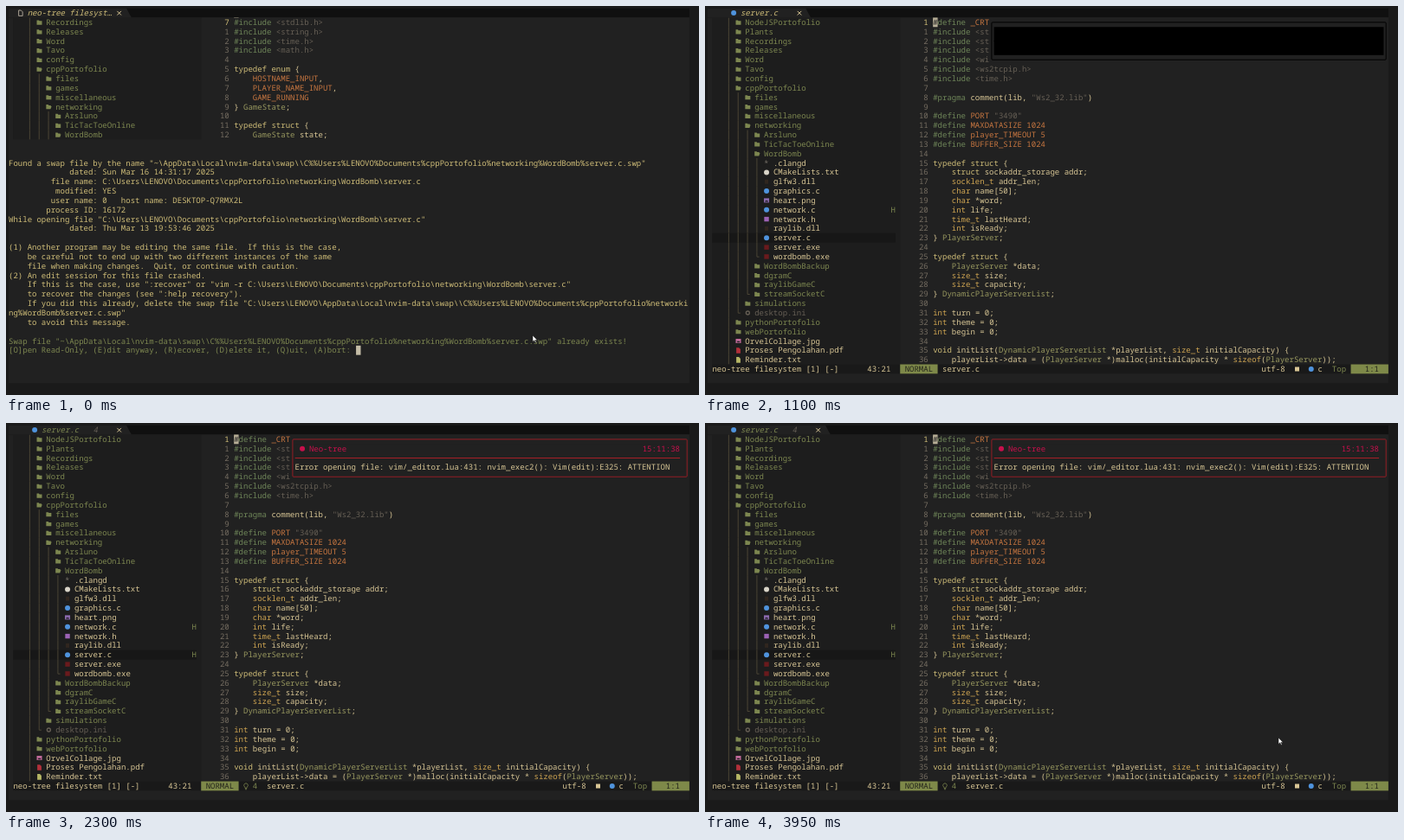
Animation of 800 by 450 pixels, one loop 4000 ms. Source, as an HTML page:

```html
<!DOCTYPE html>
<html lang="en">
<head>
<meta charset="utf-8">
<title>Editor swap file prompt</title>
<style>
html, body { margin: 0; width: 100%; height: 100%; overflow: hidden; background: #1a1a1a; }
svg { display: block; width: 800px; height: 450px; }
text {
  font: 9.033px "Noto Sans Mono", "DejaVu Sans Mono", monospace;
  white-space: pre;
  text-rendering: geometricPrecision;
}
.italic { font-style: italic; }

#prompt, #early, #plain, #hint, #notify { animation: 4s step-end infinite; }
#prompt { animation-name: prompt; }
#early { animation-name: early; }
#plain { animation-name: plain; }
#hint { animation-name: hint; }
#notify { animation-name: notify; }
@keyframes prompt { 0% { visibility: visible } 21.25%, 100% { visibility: hidden } }
@keyframes early { 0% { visibility: visible } 25%, 100% { visibility: hidden } }
@keyframes plain { 0% { visibility: hidden } 21.25% { visibility: visible } 43.75%, 100% { visibility: hidden } }
@keyframes hint { 0% { visibility: hidden } 43.75%, 100% { visibility: visible } }
@keyframes notify { 0% { visibility: hidden } 25%, 100% { visibility: visible } }

.fill { animation: fill 4s linear infinite; }
.frame { fill: none; animation: frame 4s linear infinite; }
.rule { animation: rule 4s linear infinite; }
.msg { animation: msg 4s linear infinite; }
@keyframes fill { 0%, 27.5% { fill: #000 } 37.5%, 100% { fill: #212121 } }
@keyframes frame { 0%, 27.5% { stroke: #000 } 38.75% { stroke: #47171a } 50%, 100% { stroke: #941d25 } }
@keyframes rule { 0%, 27.5% { stroke: #000 } 38.75% { stroke: #7c191f } 50%, 100% { stroke: #a81f28 } }
@keyframes msg { 0%, 27.5% { opacity: 0 } 38.75% { opacity: .9 } 46%, 100% { opacity: 1 } }

#pointer { animation: seen 4s step-end infinite, move 4s ease-in-out infinite; }
@keyframes seen {
  0% { visibility: visible } 21.25% { visibility: hidden } 64%, 100% { visibility: visible }
}
@keyframes move {
  0%, 64% { transform: translate(608px, 381px) }
  72.5%, 89.5% { transform: translate(433px, 315px) }
  98.75%, 100% { transform: translate(662px, 364px) }
}
</style>
</head>
<body>
<svg viewBox="0 0 800 450">
  <clipPath id="below"><rect y="13.4" width="800" height="437"/></clipPath>
  <rect width="800" height="450" fill="#1a1a1a"/>
  <rect x="3" y="2.6" width="785.9" height="433.6" fill="#212121"/>
  <rect x="3" y="2.6" width="785.9" height="10.8" fill="#101010"/>
  <g id="editor"></g>
  <g id="plain"></g>
  <g id="hint"></g>
  <g id="early" clip-path="url(#below)"></g>
  <g id="prompt"></g>
  <g id="notify"></g>
  <path id="pointer" d="M0 0v7.4l1.8-1.6 1.3 2.7 1.1-.5-1.3-2.6h2.4z" fill="#fff" stroke="#111" stroke-width=".5"/>
</svg>
<script>
const CW = 5.42, LH = 10.84, LEFT = 3, TOP = 2.6;
const C = {
  fg: '#d8c695', olive: '#7d8750', green: '#6f8659', khaki: '#cfbd78', yellow: '#cfa552', orange: '#c77640',
  dim: '#665f55', num: '#756d61', line: '#57503b', bg: '#212121', side: '#1d1d1d',
  dark: '#191919', block: '#7e8949', blue: '#4f93dd', red: '#c8104c'
};
const $ = id => document.getElementById(id);
const X = col => LEFT + col * CW;
const Y = row => TOP + row * LH;

function add(parent, tag, attrs, text) {
  const el = document.createElementNS('http://www.w3.org/2000/svg', tag);
  for (const k in attrs) el.setAttribute(k, attrs[k]);
  if (text) el.textContent = text;
  parent.append(el);
  return el;
}
const write = (g, col, row, str, fill = C.fg, cls = '') =>
  add(g, 'text', { x: X(col), y: Y(row) + 8.5, fill, class: cls }, str);
const cells = (g, col, row, w, h, fill) =>
  add(g, 'rect', { x: X(col), y: Y(row), width: w * CW, height: h * LH, fill });
const path = (g, d, fill, stroke) =>
  add(g, 'path', { d, fill: fill || 'none', stroke: stroke || 'none' });
const dot = (g, col, row, fill) =>
  add(g, 'circle', { cx: X(col) + 3, cy: Y(row) + 5.5, r: 3, fill });
const box = (g, col, row, w, h, fill) =>
  add(g, 'rect', { x: X(col) + 3 - w / 2, y: Y(row) + 5.5 - h / 2, width: w, height: h, fill });

// Sidebar: depth, kind, name
const entries = `0d NodeJSPortofolio
0d Plants
0d Recordings
0d Releases
0d Word
0d Tavo
0d config
0o cppPortofolio
1d files
1d games
1d miscellaneous
1o networking
2d Arsluno
2d TicTacToeOnline
2o WordBomb
3* .clangd
3m CMakeLists.txt
3l glfw3.dll
3c graphics.c
3p heart.png
3c network.c
3h network.h
3l raylib.dll
3c server.c
3x server.exe
3x wordbomb.exe
2d WordBombBackup
2d dgramC
2d raylibGameC
2d streamSocketC
1d simulations
1i desktop.ini
0d pythonPortofolio
0d webPortofolio
0j OrvelCollage.jpg
0f Proses Pengolahan.pdf
0t Reminder.txt`.split('\n');

function icon(g, kind, col, row) {
  const x = X(col), y = Y(row) + 2.8;
  const page = fill => path(g, `M${x + .6} ${y - .4}h3l1.8 1.8v4.8h-4.8z`, fill);
  const picture = fill => {
    box(g, col, row, 6, 5, fill);
    path(g, `M${x + 1} ${y + 4.4}l1.4-2 1 1 .7-.8 1 1.8z`, C.side);
  };
  const kinds = {
    d: () => path(g, `M${x} ${y + .2}h2.4l.8.9h2.8v4.3h-6z`, C.olive),
    o: () => path(g, `M${x} ${y + .2}h2.3l.8.9h2.3v1h.9l-1.2 3.3h-5.1z`, C.olive),
    '*': () => write(g, col, row, '*', '#777168'),
    m: () => dot(g, col, row, '#d8d4c8'),
    l: () => box(g, col, row, 4, 5, '#30261f'),
    c: () => dot(g, col, row, C.blue),
    h: () => box(g, col, row, 5.4, 5.4, '#9c62b4'),
    p: () => picture('#8d6bb0'),
    x: () => box(g, col, row, 5.4, 5.4, '#6a1a1d'),
    i: () => add(g, 'circle', { cx: x + 3, cy: y + 2.7, r: 2, fill: 'none', stroke: C.dim, 'stroke-width': 1.3 }),
    j: () => picture('#c06a9a'),
    f: () => page('#b3303a'),
    t: () => page('#b6b765')
  };
  kinds[kind]();
}

function drawTree(g, shift) {
  cells(g, 1, 1, 40, 37, C.side);
  entries.forEach((entry, i) => {
    const depth = +entry[0], kind = entry[1], name = entry.slice(3), row = i + 1 - shift;
    const col = 6 + 2 * depth;
    if (name === 'server.c') cells(g, 1, row, 39, 1, '#171717');
    for (let k = 0; k <= depth; k++) {
      const last = k === depth && entries[i + 1] && +entries[i + 1][0] < depth;
      const x = X(4.5 + 2 * k);
      path(g, `M${x} ${Y(row)}v${last ? LH / 2 + .3 : LH}${last ? 'h2.7' : ''}`, '', C.line)
        .setAttribute('stroke-width', .8);
    }
    icon(g, kind, col, row);
    write(g, col + 2, row, name, 'do'.includes(kind) ? C.olive : kind === 'i' ? C.dim : C.fg);
    if (name === 'network.c') write(g, 39, row, 'H', C.olive);
  });
}

const rules = [
  [/^#\w+/, C.green],
  [/^(<[a-z]\S*|"[^"]*"?)/, C.dim],
  [/^([A-Z][A-Z_]{2,}|_CRT|player_TIMEOUT)\b( \d+)?/, C.orange],
  [/^(typedef|struct|enum|void)\b/, C.khaki],
  [/^(int|char|float|bool|size_t|time_t|socklen_t|sizeof)\b/, C.yellow],
  [/^(Game|Player|Dynamic|Texture2|Rect|Vector)\w*/, '#98985f'],
  [/^(\w+|\s+|.)/, C.fg]
];
function drawCode(g, first, src) {
  cells(g, 41, 1, 104, 37, C.bg);
  src.split('\n').forEach((str, i) => {
    write(g, 45, i + 1, String(i || first).padStart(2), i ? C.num : C.khaki);
    const line = write(g, 48, i + 1, '');
    while (str) {
      const [re, fill] = rules.find(r => r[0].test(str));
      const tok = str.match(re)[0];
      add(line, 'tspan', { fill }, tok);
      str = str.slice(tok.length);
    }
  });
}

const serverCode = `#define _CRT
#include <st
#include <st
#include <st
#include <wi
#include <ws2tcpip.h>
#include <time.h>

#pragma comment(lib, "Ws2_32.lib")

#define PORT "3490"
#define MAXDATASIZE 1024
#define player_TIMEOUT 5
#define BUFFER_SIZE 1024

typedef struct {
    struct sockaddr_storage addr;
    socklen_t addr_len;
    char name[50];
    char *word;
    int life;
    time_t lastHeard;
    int isReady;
} PlayerServer;

typedef struct {
    PlayerServer *data;
    size_t size;
    size_t capacity;
} DynamicPlayerServerList;

int turn = 0;
int theme = 0;
int begin = 0;

void initList(DynamicPlayerServerList *playerList, size_t initialCapacity) {
    playerList->data = (PlayerServer *)malloc(initialCapacity * sizeof(PlayerServer));`;

const gameCode = `#include <stdlib.h>
#include <string.h>
#include <time.h>
#include <math.h>

typedef enum {
    HOSTNAME_INPUT,
    PLAYER_NAME_INPUT,
    GAME_RUNNING
} GameState;

typedef struct {
    GameState state;
    char hostname[64];
    char playerName[50];
    char wordInput[MAX_WORD_LENGTH];
    PlayerClient currentPlayer;
    DynamicPlayerClientList otherPlayers;
    Texture2D heartTexture;
    bool gameStarted;
    Rectangle wordInputBox;
    Rectangle submitButton;
} GameContext;

void drawPlayer(PlayerClient player, Vector2 pos, Texture2D heartTexture) {
    float nameWidth = MeasureText(player.name, 20);
    float wordWidth = MeasureTe`;

const warning = String.raw`Found a swap file by the name "~\AppData\Local\nvim-data\swap\\C%%Users%LENOVO%Documents%cppPortofolio%networking%WordBomb%server.c.swp"
             dated: Sun Mar 16 14:31:17 2025
         file name: C:\Users\LENOVO\Documents\cppPortofolio\networking\WordBomb\server.c
          modified: YES
         user name: 0   host name: DESKTOP-Q7RMX2L
        process ID: 16172
While opening file "C:\Users\LENOVO\Documents\cppPortofolio\networking\WordBomb\server.c"
             dated: Thu Mar 13 19:53:46 2025

(1) Another program may be editing the same file.  If this is the case,
    be careful not to end up with two different instances of the same
    file when making changes.  Quit, or continue with caution.
(2) An edit session for this file crashed.
    If this is the case, use ":recover" or "vim -r C:\Users\LENOVO\Documents\cppPortofolio\networking\WordBomb\server.c"
    to recover the changes (see ":help recovery").
    If you did this already, delete the swap file "C:\Users\LENOVO\AppData\Local\nvim-data\swap\\C%%Users%LENOVO%Documents%cppPortofolio%networki
ng%WordBomb%server.c.swp"
    to avoid this message.

Swap file "~\AppData\Local\nvim-data\swap\\C%%Users%LENOVO%Documents%cppPortofolio%networking%WordBomb%server.c.swp" already exists!`.split('\n');

function drawWarning(g, top, from) {
  cells(g, 0, top, 145, 40 - top, C.bg);
  warning.slice(from).forEach((str, i) =>
    write(g, 0, 16 + from + i, str, str.startsWith('Swap') ? C.olive : C.khaki));
}

function drawTab(g, end, closeCol) {
  const x = X(end);
  path(g, `M3 ${TOP}H${x - 5}L${x + 1} ${Y(1)}H3z`, C.bg);
  const cx = X(closeCol) + 3, cy = Y(0) + 5.6;
  path(g, `M${cx - 2.3} ${cy - 2.3}l4.6 4.6m0-4.6l-4.6 4.6`, '', C.fg);
}

// Main screen
const editor = $('editor');
drawTree(editor, 0);
drawCode(editor, 1, serverCode);
cells(editor, 48, 1, 1, 1, '#b9b098');
write(editor, 48, 1, '#', '#222');
cells(editor, 1, 38, 144, 1, C.dark);
write(editor, 1, 38, 'neo-tree filesystem [1] [-]');
write(editor, 34, 38, '43:21');
cells(editor, 41, 38, 8, 1, C.block);
write(editor, 42, 38, 'NORMAL', '#24251c');
write(editor, 118, 38, 'utf-8');
box(editor, 125, 38, 5, 5, C.fg);
dot(editor, 128, 38, C.blue);
write(editor, 130, 38, 'c');
write(editor, 133, 38, 'Top', C.olive);
cells(editor, 137, 38, 8, 1, C.block);
write(editor, 140, 38, '1:1', '#24251c');

// File tab and status, before and after the diagnostics arrive
const plain = $('plain'), hint = $('hint');
drawTab(plain, 21.8, 19);
dot(plain, 5, 0, C.blue);
write(plain, 7, 0, 'server.c', C.khaki, 'italic');
write(plain, 50, 38, 'server.c');

drawTab(hint, 26, 23);
dot(hint, 5, 0, C.blue);
write(hint, 7, 0, 'server.c', C.olive, 'italic');
write(hint, 18, 0, '4', C.dim, 'italic');
write(hint, 39, 24, 'H', C.olive);
const bx = X(50) + 3, by = Y(38) + 4.6;
path(hint, `M${bx - 1} ${by + 2.1}a2.3 2.3 0 1 1 2 0v1.2h-2zm0 2.5h2`, '', C.olive).setAttribute('stroke-width', .8);
write(hint, 52, 38, '4', C.olive);
write(hint, 55, 38, 'server.c');

// Half-redrawn screen, then the full prompt on top of it
const early = $('early'), prompt = $('prompt');
drawTree(early, 2);
drawCode(early, 7, gameCode);
drawWarning(early, 28, 12);
drawWarning(prompt, 14, 0);
write(prompt, 0, 36, '[O]pen Read-Only, (E)dit anyway, (R)ecover, (D)elete it, (Q)uit, (A)bort:', C.olive);
cells(prompt, 74, 36, 1, 1, '#c3bca6');
drawTab(prompt, 26, 23);
path(prompt, `M${X(2) + .8} ${Y(0) + 2.4}h2.7l1.8 1.8v4.6h-4.5z`, '', '#aaa294');
write(prompt, 4, 0, 'neo-tree filesyst…', C.khaki, 'italic');

// Notification
const notify = $('notify');
cells(notify, 60, 1, 85, 5, C.bg);
cells(notify, 61, 2, 83, 3, C.bg).setAttribute('class', 'fill');
add(notify, 'rect', {
  x: X(60.5), y: Y(1.5), width: 84 * CW, height: 4 * LH, rx: 1, class: 'frame'
});
path(notify, `M${X(61)} ${Y(3.5)}H${X(143)}`).setAttribute('class', 'rule');
const msg = add(notify, 'g', { class: 'msg' });
dot(msg, 62, 2, C.red);
write(msg, 64, 2, 'Neo-tree', C.red);
write(msg, 135, 2, '15:11:38', C.red);
write(msg, 61, 4, 'Error opening file: vim/_editor.lua:431: nvim_exec2(): Vim(edit):E325: ATTENTION');
</script>
</body>
</html>
```
